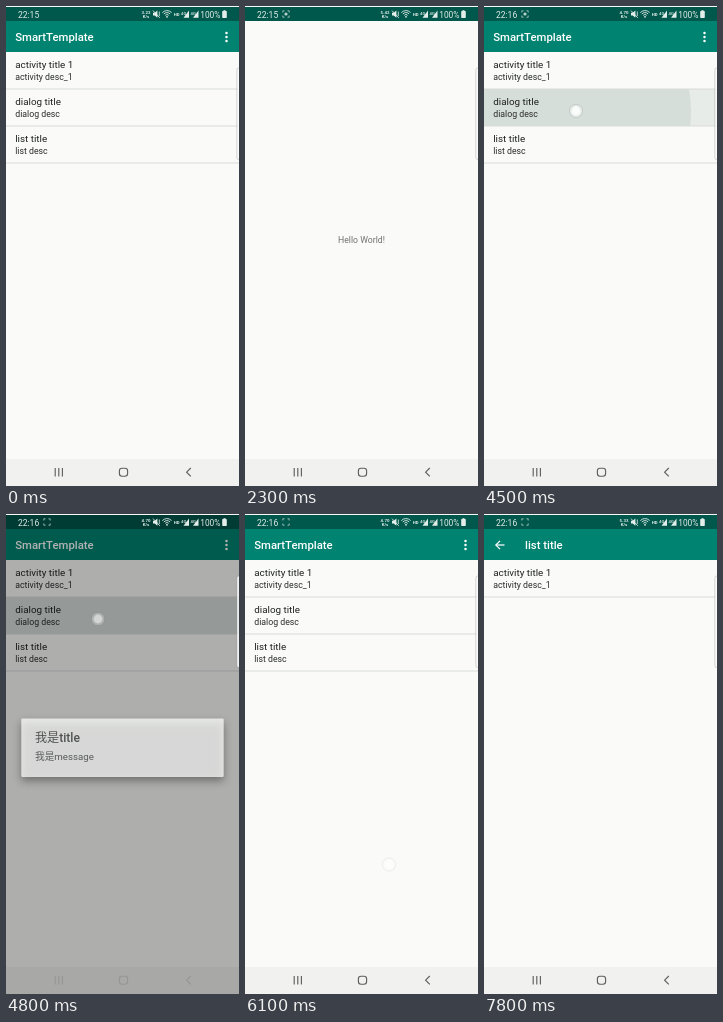
An HTML page with a canvas for the animation above (8000 ms loop, 233 by 480 pixels).

```html
<!DOCTYPE html>
<html lang="en">
<head>
<meta charset="utf-8">
<title>List demo</title>
<style>
html, body { margin: 0; width: 100%; height: 100%; overflow: hidden; background: #000; }
canvas { display: block; width: 233px; height: 480px; }
</style>
</head>
<body>
<canvas id="stage"></canvas>
<script>
const W = 233, H = 480, LOOP = 8000, STEP = 100;
const PAPER = '#fafbf9', BAR = '#008371', BAR_DARK = '#00574b', NAV = '#f1f2f0';
const FONT = 'Roboto, "Noto Sans CJK SC", "Noto Sans CJK", sans-serif';
const ROW = 37, LIST_TOP = 46;

const canvas = document.getElementById('stage');
const ctx = canvas.getContext('2d');
const dpr = window.devicePixelRatio || 1;
canvas.width = W * dpr;
canvas.height = H * dpr;

const ITEMS = [
  ['activity title 1', 'activity desc_1'],
  ['dialog title', 'dialog desc'],
  ['list title', 'list desc']
];

const TOUCHES = [
  { x: 92, y: 67, down: 1500, up: 1700, row: 0 },
  { x: 183, y: 466, down: 3000, up: 3200 },
  { x: 92, y: 105, down: 4300, up: 4650, row: 1 },
  { x: 144, y: 350.5, down: 5800, up: 5950 },
  { x: 92, y: 140, down: 6800, up: 6950, row: 2 }
];

const clamp = v => Math.min(1, Math.max(0, v));
const ramp = (t, from, to) => clamp((t - from) / (to - from));
const mix = (a, b, p) => a + (b - a) * p;

// cubic-bezier(.4, 0, .2, 1), solved by bisection
function ease(p) {
  let lo = 0, hi = 1;
  for (let i = 0; i < 20; i++) {
    const s = (lo + hi) / 2, r = 1 - s;
    if (1.2 * r * r * s + 0.6 * r * s * s + s * s * s < p) lo = s; else hi = s;
  }
  return lo * lo * (3 - 2 * lo);
}
const quick = p => 1 - Math.pow(1 - p, 6);

function rect(x, y, w, h, color) {
  ctx.fillStyle = color;
  ctx.fillRect(x, y, w, h);
}

function round(x, y, w, h, r) {
  ctx.beginPath();
  ctx.roundRect(x, y, w, h, r);
}

function disc(x, y, r, color) {
  ctx.fillStyle = color;
  ctx.beginPath();
  ctx.arc(x, y, r, 0, Math.PI * 2);
  ctx.fill();
}

function line(points, color, width) {
  ctx.strokeStyle = color;
  ctx.lineWidth = width;
  ctx.beginPath();
  points.forEach(([x, y], i) => i ? ctx.lineTo(x, y) : ctx.moveTo(x, y));
  ctx.stroke();
}

function text(str, x, y, size, color, weight = 400, align = 'left') {
  ctx.font = `${weight} ${size}px ${FONT}`;
  ctx.fillStyle = color;
  ctx.textAlign = align;
  ctx.fillText(str, x, y);
}

function windowBase() {
  rect(0, 0, W, H, PAPER);
  rect(0, 0, W, 15, BAR_DARK);
  rect(0, 453, W, 27, NAV);
}

function rowRipple(t) {
  for (const { x, y, down, up, row } of TOUCHES) {
    if (row === undefined || t < down || t > up + 400) continue;
    ctx.save();
    ctx.beginPath();
    ctx.rect(0, LIST_TOP + row * ROW, W, ROW);
    ctx.clip();
    ctx.globalAlpha = 1 - ramp(t, up + 150, up + 400);
    rect(0, 0, W, H, 'rgba(0,50,40,.07)');
    disc(x, y, mix(15, 240, ramp(t, down, up + 100)), 'rgba(0,50,40,.08)');
    ctx.restore();
  }
}

function rows(count) {
  for (let i = 0; i < count; i++) {
    const y = LIST_TOP + i * ROW;
    text(ITEMS[i][0], 9.2, y + 15.6, 9.85, '#1f2120');
    text(ITEMS[i][1], 9.2, y + 27.8, 8.75, '#2b2d2c');
    rect(0, y + ROW - 0.5, W, 1, '#d9dbd9');
  }
}

function homePage(t) {
  windowBase();
  rect(0, 15, W, 31, BAR);
  text('SmartTemplate', 9.2, 35, 11.33, '#fff', 500);
  for (const y of [27, 31, 35]) disc(220.5, y, 1.25, '#fff');
  rowRipple(t);
  rows(3);
}

function listPage() {
  windowBase();
  rect(0, 15, W, 31, BAR);
  line([[20.5, 31], [12, 31]], '#fff', 1.2);
  line([[16, 26.8], [11.8, 31], [16, 35.2]], '#fff', 1.2);
  text('list title', 41, 35, 11.33, '#fff', 500);
  rows(1);
}

function helloPage() {
  windowBase();
  text('Hello World!', 116.5, 237.2, 8.7, '#707270', 400, 'center');
}

// Upper window slides by 4.1% behind a moving top clip, lower one by 2%.
function stack(t, open, clip) {
  ctx.save();
  ctx.translate(0, -0.02 * H * open);
  homePage(t);
  ctx.restore();
  if (clip < 0.04) return;
  ctx.save();
  ctx.beginPath();
  ctx.rect(0, H * (1 - clip), W, H);
  ctx.clip();
  ctx.translate(0, 0.041 * H * (1 - open));
  helloPage();
  ctx.restore();
}

function pages(t) {
  if (t < 1650 || t >= 3775 && t < 7000) homePage(t);
  else if (t < 3350) {
    const p = ramp(t, 1650, 2075);
    stack(t, ease(p), quick(p));
  } else if (t < 3775) {
    const p = ramp(t, 3350, 3775);
    stack(t, 1 - ease(p), 1 - quick(clamp(p * 1.5)));
  } else {
    homePage(t);
    ctx.globalAlpha = ramp(t, 6950, 7150);
    listPage();
    ctx.globalAlpha = 1;
  }
}

function dialog(p) {
  if (!p) return;
  rect(0, 0, W, H, `rgba(0,0,0,${0.61 * p})`);
  ctx.save();
  ctx.globalAlpha = clamp(p * 1.45);
  ctx.shadowColor = 'rgba(0,0,0,.5)';
  ctx.shadowBlur = 9 * dpr;
  ctx.shadowOffsetY = 4 * dpr;
  ctx.fillStyle = '#fefffe';
  round(15.3, 204.5, 202.4, 58.5, 1.2);
  ctx.fill();
  ctx.shadowColor = 'transparent';
  text('我是', 29, 228.3, 12.1, '#1f2120');
  text('title', 53.2, 228.3, 12.1, '#1f2120', 500);
  text('我是message', 29, 246.3, 9.7, '#2b2d2c');
  ctx.restore();
}

function touches(t) {
  for (const { x, y, down, up } of TOUCHES) {
    if (t < down || t >= up + 350) continue;
    ctx.globalAlpha = 1 - ramp(t, up, up + 350);
    disc(x, y, 6.6, 'rgba(255,255,255,.4)');
    ctx.strokeStyle = 'rgba(0,0,0,.14)';
    ctx.lineWidth = 0.8;
    ctx.stroke();
    disc(x, y, 4.4, 'rgba(255,255,255,.8)');
  }
  ctx.globalAlpha = 1;
}

function captureIcon(t) {
  if (t < 300) return;
  const ink = '#b9d2cc';
  for (const sx of [-1, 1]) for (const sy of [-1, 1]) {
    const x = 41 + sx * 3.2, y = 8 + sy * 3.2;
    line([[x - sx * 1.7, y], [x, y], [x, y - sy * 1.7]], ink, 0.8);
  }
  if (Math.floor((t - 300) / 500) % 2 === 0) disc(41, 8, 1.6, ink);
}

function signal(x, ink) {
  text('4G', x, 8.6, 4.2, ink, 500);
  ctx.beginPath();
  ctx.moveTo(x + 8, 4.6);
  ctx.lineTo(x + 8, 11.8);
  ctx.lineTo(x + 2.5, 11.8);
  ctx.fill();
}

function statusIcons(t) {
  const ink = '#e3eeeb';
  text(t < 4000 ? '22:15' : '22:16', 12, 11.5, 8.5, ink);
  captureIcon(t);

  const speed = t < 800 ? '3.23' : t < 2800 ? '5.42' : t < 7800 ? '4.70' : '5.33';
  text(speed, 140, 7.8, 4.4, ink, 700, 'center');
  text('K/s', 140, 12.2, 4.4, ink, 700, 'center');

  ctx.beginPath();
  for (const [x, y] of [[147, 6.8], [148.7, 6.8], [151.4, 4.5], [151.4, 11.7], [148.7, 9.4], [147, 9.4]]) ctx.lineTo(x, y);
  ctx.fill();
  line([[147, 4.6], [153.8, 11.8]], ink, 0.9);
  line([[153.3, 5.5], [153.3, 10]], ink, 0.8);

  ctx.lineWidth = 0.9;
  for (const r of [2.4, 4.4, 6.4]) {
    ctx.beginPath();
    ctx.arc(161, 11, r, -Math.PI * 0.76, -Math.PI * 0.24);
    ctx.stroke();
  }
  disc(161, 10.8, 0.9, ink);
  text('HD', 167.7, 10, 4.3, ink, 700);
  signal(175, ink);
  signal(184.5, ink);
  text('100%', 194.2, 11.5, 8.4, ink);
  rect(217.5, 4.2, 2, 1.2, ink);
  round(216.2, 5, 4.6, 7, 0.7);
  ctx.fill();
}

function navIcons(t, p) {
  const press = ramp(t, 2950, 3100) * (1 - ramp(t, 3500, 3850));
  if (press) {
    ctx.fillStyle = `rgba(0,0,0,${0.05 * press})`;
    round(147, 452.5, 69, 27, 13);
    ctx.fill();
  }
  const g = Math.round(mix(95, 205, p));
  const ink = `rgb(${g},${g},${g})`;
  for (const x of [49.2, 52.8, 56.4]) line([[x, 462], [x, 470.4]], ink, 1.15);
  round(113.4, 462.2, 8.2, 8, 2.6);
  ctx.stroke();
  line([[184.8, 462], [180.6, 466.2], [184.8, 470.4]], ink, 1.15);
}

function edgeHandle() {
  round(230.8, 62, 8, 91.5, 2);
  ctx.fillStyle = 'rgba(250,251,249,.85)';
  ctx.fill();
  ctx.strokeStyle = 'rgba(0,0,0,.17)';
  ctx.lineWidth = 0.9;
  ctx.stroke();
}

function draw(t) {
  ctx.setTransform(dpr, 0, 0, dpr, 0, 0);
  rect(0, 0, W, H, '#000');
  const shown = ramp(t, 4650, 4950) * (1 - ramp(t, 5950, 6090));
  pages(t);
  dialog(shown);
  statusIcons(t);
  navIcons(t, shown);
  edgeHandle();
  touches(t);
  rect(0, 0, W, 1, '#f6f9f7');
}

const start = performance.now();
function tick() {
  const t = (performance.now() - start) % LOOP;
  draw(Math.floor(t / STEP) * STEP);
  requestAnimationFrame(tick);
}
tick();
</script>
</body>
</html>
```
